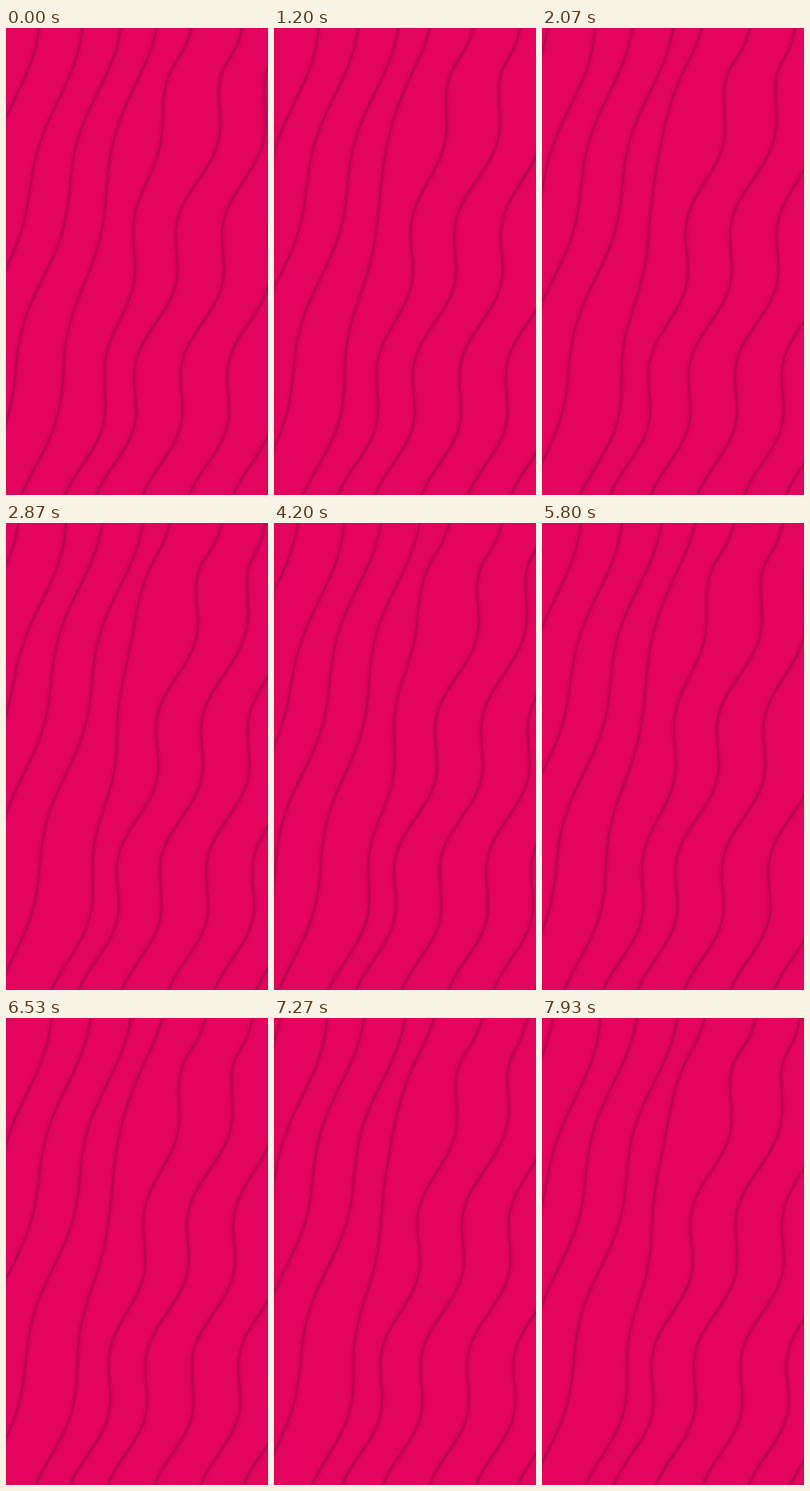
Write an HTML page with a canvas that moves like this. It is 270 by 480 pixels and loops after 8 s.

```html
<!DOCTYPE html>
<html lang="en">
<head>
<meta charset="utf-8">
<title>Paper waves</title>
<style>
  html, body { margin: 0; width: 100%; height: 100%; overflow: hidden; background: #e3045d; }
  canvas { display: block; width: 100vw; height: 100vh; }
</style>
</head>
<body>
<canvas id="stage" width="270" height="480"></canvas>
<script>
const ctx = document.getElementById('stage').getContext('2d');
const W = 270, H = 480;
const LOOP = 8, FPS = 15;
const SPACING = 43.2, SPEED = 8.3, OFFSET = 27.4;
const SLANT = 0.295;

const clamp = (v, lo, hi) => Math.min(hi, Math.max(lo, v));
const ease = (a, b, v) => {
  const k = clamp((v - a) / (b - a), 0, 1);
  return k * k * (3 - 2 * k);
};
const bell = (v, center, width) => Math.exp(-(((v - center) / width) ** 2));
const wave = (y, crest, length) => Math.cos(2 * Math.PI * (y - crest) / length);

// Standing ripple field: slanted lines bend as they drift through it.
function ripple(u, y) {
  const right = ease(145, 228, u);
  const long = 6 * wave(y, 20, 190) * (1 - right);
  const short = 9 * wave(y, 122, 145) * right * ease(0, 50, y);
  const sway = 18 * bell(u, 183, 28) * wave(y, 410, 680);
  const bulges = 12 * bell(u, 52, 24) * bell(y, 75, 90)
               + 8 * bell(u, 272, 26) * bell(y, 75, 45);
  const spread = clamp((u - 240) * 0.11, 0, 12);
  return long + short + sway + bulges + spread * ease(60, 200, y);
}

function foldPath(u) {
  const path = new Path2D();
  for (let y = -4; y <= H + 4; y += 4) {
    path.lineTo(u - SLANT * y + ripple(u, y), y);
  }
  return path;
}

function strokeFold(path) {
  // Nested strokes build a soft shadow around a thin crease.
  for (let width = 8; width >= 1; width *= 0.64) {
    ctx.lineWidth = width;
    ctx.strokeStyle = `rgba(96, 0, 62, ${0.22 / Math.sqrt(width) / (1 + width / 5)})`;
    ctx.stroke(path);
  }
}

function draw(t) {
  ctx.fillStyle = '#e3045d';
  ctx.fillRect(0, 0, W, H);
  const first = (OFFSET + SPEED * t) % SPACING - SPACING;
  for (let u = first; u < W + SLANT * H + SPACING; u += SPACING) {
    strokeFold(foldPath(u));
  }
}

const start = performance.now();
function tick() {
  const t = ((performance.now() - start) / 1000) % LOOP;
  draw(Math.floor(t * FPS + 0.01) / FPS);
  requestAnimationFrame(tick);
}
tick();
</script>
</body>
</html>
```
